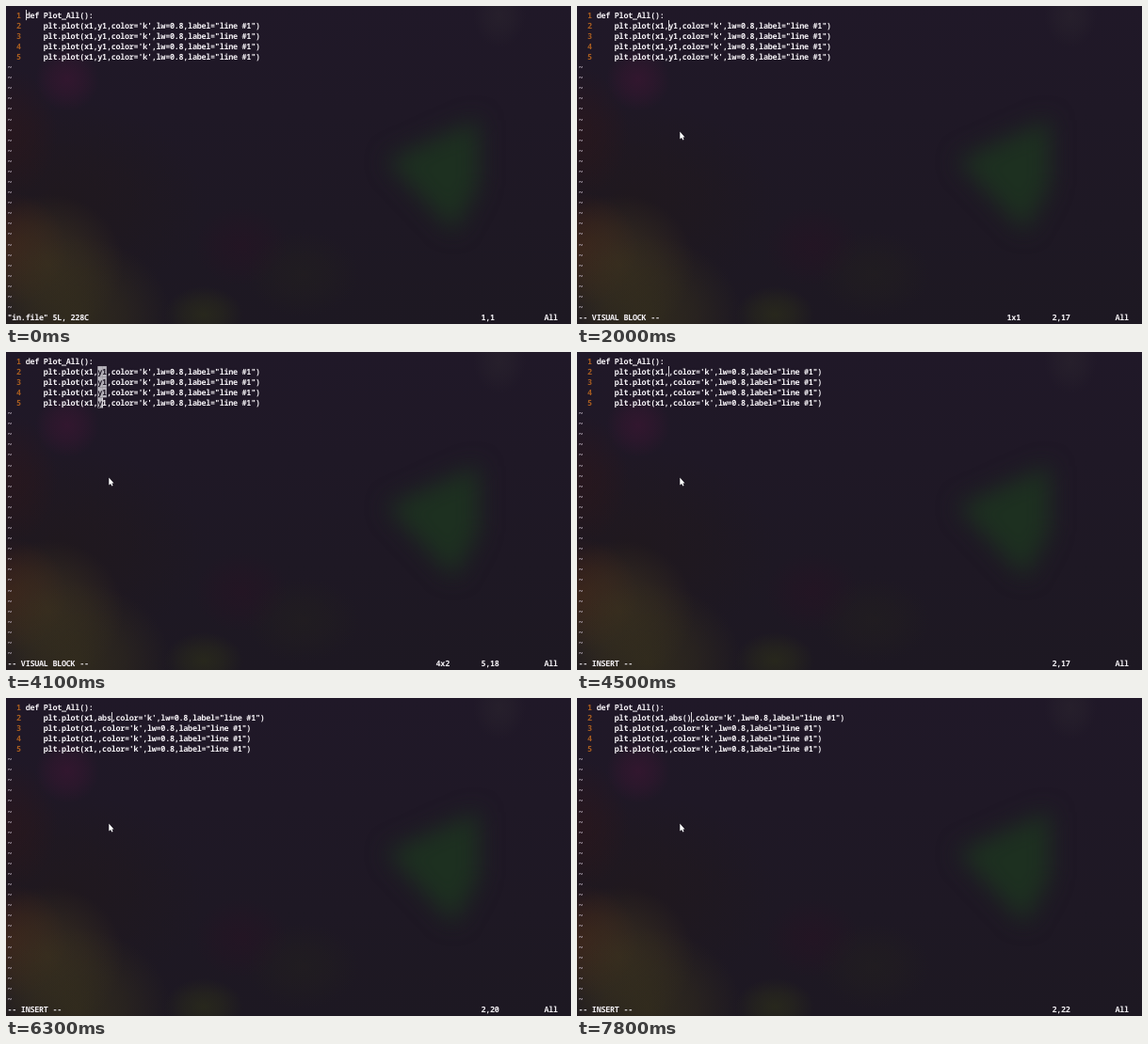
An HTML page with a canvas for the animation above (8 s loop, 600x338 px).

```html
<!DOCTYPE html>
<html lang="en">
<head>
<meta charset="utf-8">
<title>Block editing</title>
<style>
  html, body { margin: 0; width: 100%; height: 100%; overflow: hidden; background: #1f1826; }
  canvas { display: block; width: 600px; height: 338px; }
</style>
</head>
<body>
<canvas id="stage"></canvas>
<script>
const W = 600, H = 338, LOOP = 8000;
const CELL_W = 4.79, CELL_H = 11.09, LEFT = 1.5, TOP = 4, GUTTER = 4;
const COLORS = { text: '#f4f1f5', number: '#a85d20', tilde: '#c4b9c8', selection: '#b8b5bd' };
const STATUS_ROW = 29;

const scale = window.devicePixelRatio || 1;

function makeContext(canvas) {
  canvas.width = W * scale;
  canvas.height = H * scale;
  const context = canvas.getContext('2d');
  context.scale(scale, scale);
  return context;
}

const ctx = makeContext(document.getElementById('stage'));
ctx.font = '600 8.5px "Noto Sans Mono", "DejaVu Sans Mono", monospace';
ctx.textRendering = 'geometricPrecision';

// Each state holds until the next one starts.
const states = [
  { at: 0, row: 1, col: 1, status: '"in.file" 5L, 228C' },
  { at: 400, row: 2, col: 1 },
  { at: 600, col: 17 },
  { at: 2000, status: '-- VISUAL BLOCK --', command: '1x1' },
  { at: 3100, command: '3' },
  { at: 3300, row: 5, command: '4x1', selected: 1 },
  { at: 3900, col: 18, command: '4x2', selected: 2 },
  { at: 4500, row: 2, col: 17, status: '-- INSERT --', command: '', selected: 0, cut: true },
  { at: 5500, col: 18, typed: 'a' },
  { at: 6000, col: 19, typed: 'ab' },
  { at: 6300, col: 20, typed: 'abs' },
  { at: 7100, col: 21, typed: 'abs(' },
  { at: 7400, col: 22, typed: 'abs()' }
];

function stateAt(time) {
  return Object.assign({ command: '', selected: 0, cut: false, typed: '' },
    ...states.filter(state => state.at <= time));
}

const cellX = col => LEFT + col * CELL_W;
const cellY = row => TOP + row * CELL_H;

function write(text, col, row, color = COLORS.text) {
  ctx.fillStyle = color;
  [...text].forEach((char, i) => ctx.fillText(char, cellX(col + i), cellY(row) + 8.6));
}

function makeBackground() {
  const canvas = document.createElement('canvas');
  const bg = makeContext(canvas);

  function glow(x, y, rx, ry, rgb, alpha) {
    bg.save();
    bg.translate(x, y);
    bg.scale(rx, ry);
    const gradient = bg.createRadialGradient(0, 0, 0, 0, 0, 1);
    gradient.addColorStop(0, `rgba(${rgb},${alpha})`);
    gradient.addColorStop(0.5, `rgba(${rgb},${alpha * 0.6})`);
    gradient.addColorStop(1, `rgba(${rgb},0)`);
    bg.fillStyle = gradient;
    bg.fillRect(-1, -1, 2, 2);
    bg.restore();
  }

  const base = bg.createLinearGradient(0, 0, 0, H);
  base.addColorStop(0, '#201828');
  base.addColorStop(1, '#1d1822');
  bg.fillStyle = base;
  bg.fillRect(0, 0, W, H);

  glow(65, 78, 34, 34, '62,22,52', 0.6);
  glow(60, 210, 150, 110, '32,24,26', 0.6);
  glow(0, 135, 55, 70, '48,22,24', 0.5);
  glow(5, 258, 60, 60, '72,34,22', 0.65);
  glow(45, 275, 80, 75, '60,50,32', 0.75);
  glow(75, 330, 100, 85, '54,48,28', 0.75);
  glow(250, 255, 50, 42, '40,18,36', 0.5);
  glow(315, 285, 60, 45, '34,31,31', 0.6);
  glow(210, 328, 42, 30, '44,46,26', 0.7);
  glow(524, 10, 28, 34, '46,40,48', 0.45);

  bg.filter = `blur(${12 * scale}px)`;
  bg.fillStyle = '#1d3020';
  bg.beginPath();
  bg.moveTo(404, 164);
  bg.lineTo(502, 120);
  bg.lineTo(502, 190);
  bg.lineTo(476, 240);
  bg.fill();
  return canvas;
}

const background = makeBackground();

const pointer = new Path2D('M109.3 133.5 V141.5 L111.1 139.9 L112.4 142.6 L113.6 142 L112.4 139.4 H114.5 Z');

function drawSelection({ row, col, selected }, lines) {
  for (let r = 2; r <= row; r++) {
    for (let c = 17; c < 17 + selected; c++) {
      if (r === row && c === col) continue;
      const column = GUTTER + c - 1;
      ctx.fillStyle = COLORS.selection;
      ctx.fillRect(cellX(column), cellY(r - 1), CELL_W, CELL_H);
      write(lines[r - 1][c - 1], column, r - 1, '#1f1826');
    }
  }
}

function draw(time) {
  const state = stateAt(time);
  const plot = y => `    plt.plot(x1,${y},color='k',lw=0.8,label="line #1")`;
  const other = plot(state.cut ? '' : 'y1');
  const edited = state.cut ? plot(state.typed) : other;
  const lines = ['def Plot_All():', edited, other, other, other];

  ctx.drawImage(background, 0, 0, W, H);
  lines.forEach((line, row) => {
    write(String(row + 1), 2, row, COLORS.number);
    write(line, GUTTER, row);
  });
  for (let row = lines.length; row < STATUS_ROW; row++) write('~', 0, row, COLORS.tilde);
  drawSelection(state, lines);

  write(state.status, 0, STATUS_ROW);
  write(state.command, 95, STATUS_ROW);
  write(`${state.row},${state.col}`, 105, STATUS_ROW);
  write('All', 119, STATUS_ROW);

  ctx.fillStyle = '#d8d5da';
  ctx.fillRect(Math.round(cellX(GUTTER + state.col - 1)), cellY(state.row - 1), 1, CELL_H);

  if (time >= 100) {
    ctx.strokeStyle = '#15101a';
    ctx.stroke(pointer);
    ctx.fillStyle = '#fff';
    ctx.fill(pointer);
  }
}

const start = performance.now();
function tick() {
  draw((performance.now() - start) % LOOP);
  requestAnimationFrame(tick);
}
tick();
</script>
</body>
</html>
```
